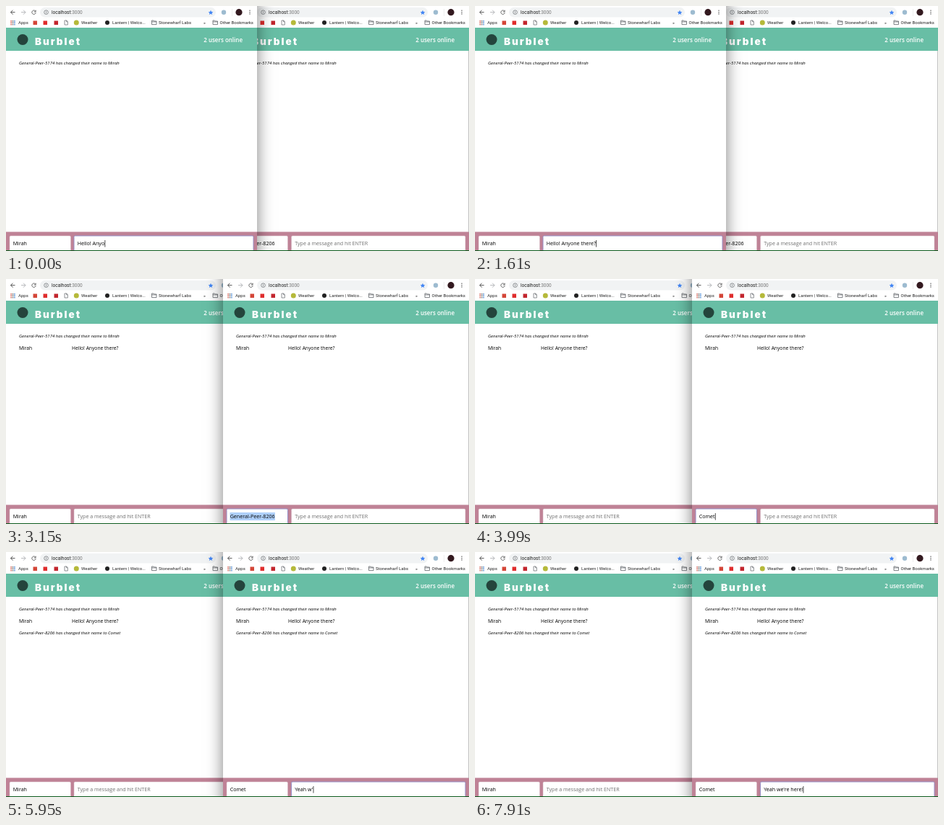
An HTML page with a canvas for the animation above (8000 ms loop, 640 by 339 pixels).

```html
<!DOCTYPE html>
<html lang="en">
<head>
<meta charset="utf-8">
<title>Chat</title>
<style>
  html, body { margin: 0; width: 100%; height: 100%; overflow: hidden; background: #fff; }
  canvas { display: block; width: 640px; height: 339px; }
</style>
</head>
<body>
<canvas id="stage"></canvas>
<script>
const LOOP = 8000, KEY = 140;
const SENT = 1960, SWAP = 2240, SELECT = 2940, RENAME = 3430, RENAMED = 4340, REPLY = 4970, FIX = 6090;
const NAME = 'Mirah', GUEST = 'General-Peer-5174', HOST = 'General-Peer-8206', NEW_NAME = 'Comet';
const HELLO = 'Hello! Anyone there?', TYPO = "Yeah w'", ANSWER = "Yeah we're here!";
const PAGE = '"Open Sans", sans-serif', FIELD = '7.1px ' + PAGE, MESSAGE = '6.7px ' + PAGE;
const CHROME = 'Roboto, sans-serif', GREY = '#5f6368';

const canvas = document.getElementById('stage'), ctx = canvas.getContext('2d');
const dpr = window.devicePixelRatio || 1;
canvas.width = 640 * dpr;
canvas.height = 339 * dpr;

function rect(x, y, w, h, fill) {
  ctx.fillStyle = fill;
  ctx.fillRect(x, y, w, h);
}
function rounded(x, y, w, h, r, fill, stroke, line = 1) {
  ctx.beginPath();
  ctx.roundRect(x, y, w, h, r);
  if (fill) { ctx.fillStyle = fill; ctx.fill(); }
  if (stroke) { ctx.strokeStyle = stroke; ctx.lineWidth = line; ctx.stroke(); }
}
function dot(x, y, r, fill) {
  rounded(x - r, y - r, 2 * r, 2 * r, r, fill);
}
function trace(d, x, y, stroke, line, fill) {
  ctx.save();
  ctx.translate(x, y);
  const path = new Path2D(d);
  if (fill) { ctx.fillStyle = fill; ctx.fill(path); }
  if (stroke) { ctx.strokeStyle = stroke; ctx.lineWidth = line; ctx.stroke(path); }
  ctx.restore();
}
function text(s, x, y, font, fill = '#000', align = 'left') {
  ctx.font = font;
  ctx.fillStyle = fill;
  ctx.textAlign = align;
  ctx.fillText(s, x, y);
  return ctx.measureText(s).width;
}
const label = (s, x) => text(s, x, 25.2, '6px ' + CHROME, '#222');
const folder = x => trace('M0 0h2.4l.9 1h3.2v4.6h-6.5zM0 1.9h6.5', x, 20, GREY, .8);

function toolbar(w) {
  rect(0, 0, w, 31, '#fff');
  rounded(47, 2, w - 104, 13.5, 6.7, '#f1f3f4');
  trace('M3 0h-6M0 -3l-3 3l3 3', 9.5, 8.7, '#555', 1);
  trace('M-3 0h6M0 -3l3 3l-3 3', 24, 8.7, '#b4b6b9', 1);
  trace('M2.1 -1.7A2.7 2.7 0 1 0 2.7 .5M2.6 -3v2.3h-2.3', 38.5, 8.7, '#555', .9);
  trace('M2.8 0A2.8 2.8 0 1 1 -2.8 0A2.8 2.8 0 1 1 2.8 0M0 -.4v1.9M0 -1.7v.8', 55.5, 8.7, GREY, .7);
  const host = text('localhost', 63, 11, '6.5px ' + CHROME, '#222');
  text(':3000', 63 + host, 11, '6.5px ' + CHROME, '#777');

  const star = 'M0 -3.3L1 -1.1L3.3 -.9L1.6 .7L2.1 3L0 1.8L-2.1 3L-1.6 .7L-3.3 -.9L-1 -1.1Z';
  trace(star, w - 64, 9, null, 0, '#4285f4');
  dot(w - 46, 8.7, 3.2, '#9dbbd0');
  rect(w - 35, 4, .6, 10, '#e3e3e3');
  dot(w - 25, 8.7, 4.6, '#33191f');
  for (let i = -1; i < 2; i++) dot(w - 10, 8.7 + i * 2.4, .75, '#555');

  // Bookmarks
  const tints = ['#d96c5f', '#777', '#5b95d8'];
  for (let i = 0; i < 9; i++) rect(6.3 + i % 3 * 2.4, 20 + Math.floor(i / 3) * 2.4, 1.6, 1.6, tints[i % 3]);
  label('Apps', 17);
  rect(37.5, 20.5, 5.5, 5.5, '#d44638');
  rect(51.5, 20.5, 5.5, 5.5, '#df2d2d');
  rect(66.5, 20.5, 5.5, 5.5, '#c2262e');
  trace('M-2 -3h2.7l1.6 1.6v4.4h-4.3zM.6 -3v1.8h1.7', 83, 23, GREY, .7);
  dot(97.3, 23, 3.5, '#b5b93a');
  label('Weather', 104);
  dot(140, 23, 3, '#222');
  label('Lantern | Welco...', 147);
  folder(201.5);
  label('Stonewharf Labs', 211);
  label('»', w - 74);
  folder(w - 61);
  label('Other Bookmarks', w - 51.5);
}

function field(x, w, f) {
  rounded(x, 318, w, 24, 1.5, '#fff', f.focus ? '#958fc6' : '#d0b0bc', f.focus ? 1 : .5);
  if (f.selected) {
    ctx.font = FIELD;
    rect(x + 4.5, 323, ctx.measureText(f.value).width + .5, 11, '#afd0fa');
  }
  const width = text(f.value || 'Type a message and hit ENTER', x + 4.7, 331, FIELD, f.value ? '#000' : '#707070');
  if (f.focus && !f.selected) rect(x + 5 + (f.value ? width : -.6), 324, .7, 9.5, '#000');
}

function browser(win, lines, active) {
  const { x, w } = win;
  ctx.save();
  ctx.translate(x, 0);
  if (active) {
    ctx.shadowColor = 'rgba(0,0,0,.5)';
    ctx.shadowBlur = 21 * dpr;
    rect(0, -40, w, 420, '#fff');
    ctx.shadowColor = 'transparent';
  }
  ctx.beginPath();
  ctx.rect(0, 0, w, 339);
  ctx.clip();
  rect(0, 0, w, 339, '#fff');
  toolbar(w);

  rect(0, 30, w, 32, '#68bea5');
  dot(23, 46.5, 7.5, '#24443c');
  ctx.letterSpacing = '2px';
  text('Burblet', 40, 54, '900 13.5px Inter, sans-serif', '#fff');
  ctx.letterSpacing = '0px';
  text('2 users online', w - 20, 50.4, '600 8px ' + PAGE, '#fff', 'right');

  lines.forEach(([who, said], i) => {
    const y = 81.3 + i * 16.5;
    if (said) {
      text(who, 18, y, MESSAGE);
      text(said, win.column, y, MESSAGE);
    } else text(who, 18, y, 'italic 6px ' + PAGE);
  });

  rect(0, 312.5, w, 26.5, '#bf8296');
  field(5, win.name.width, win.name);
  field(win.name.width + 10 - win.inset, w - win.name.width - 15 + win.inset, win.message);
  ctx.restore();
}

const typed = (s, start, t, have = 0) =>
  s.slice(0, Math.max(0, have + Math.floor((t - start) / KEY)));

function reply(t) {
  return t < FIX ? typed(TYPO, REPLY, t, 1) : typed(ANSWER, FIX, t, 6);
}

function guestName(t) {
  return t < RENAME ? HOST : typed(NEW_NAME, RENAME, t, 1);
}

function draw(t) {
  const swapped = t >= SWAP, naming = t >= SELECT && t < RENAMED;
  const renamed = (from, to) => [`${from} has changed their name to ${to}`];
  const lines = [renamed(GUEST, NAME)];
  if (t >= SENT) lines.push([NAME, HELLO]);
  if (t >= RENAMED) lines.push(renamed(HOST, NEW_NAME));

  const left = {
    x: 0, w: 347, column: 91, inset: .5,
    name: { width: 84.5, value: NAME },
    message: { value: t < SENT ? typed(HELLO, 0, t, 11) : '', focus: !swapped }
  };
  const right = {
    x: 300, w: 340, column: 90, inset: 0,
    name: { width: 84.5, value: guestName(t), focus: naming, selected: naming && t < RENAME },
    message: { value: reply(t), focus: swapped && !naming }
  };

  ctx.setTransform(dpr, 0, 0, dpr, 0, 0);
  const order = swapped ? [left, right] : [right, left];
  order.forEach((win, i) => browser(win, lines, i === 1));
  rect(639.3, 62, .7, 251, '#aaa');
  rect(0, 338, 640, 1, '#0b5a1c');
}

function tick() {
  draw(performance.now() % LOOP);
  requestAnimationFrame(tick);
}
tick();
</script>
</body>
</html>
```
